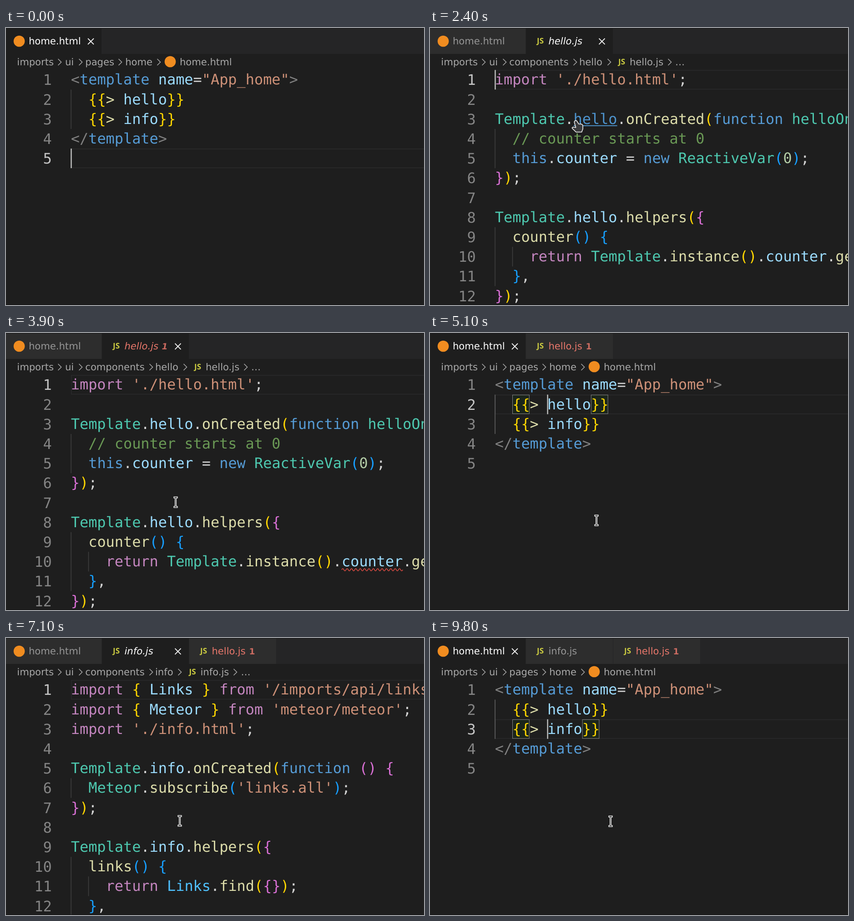
Animation, 919 px wide and 609 px high, one loop 10000 ms. Source, as an HTML page:

```html
<!DOCTYPE html>
<html lang="en">
<head>
<meta charset="utf-8">
<title>Editor navigation</title>
<style>
  html, body { margin: 0; width: 100%; height: 100%; overflow: hidden; background: #1e1e1e; }
  svg { display: block; width: 919px; height: 609px; }
  text { text-rendering: geometricPrecision; }
  .code { font: 31.89px "DejaVu Sans Mono", monospace; }
  .ui { font: 21.1px "DejaVu Sans", sans-serif; }
  .italic { font-style: italic; }
  .badge { font: 600 18.7px "DejaVu Sans", sans-serif; opacity: .85; }
  .badge.italic { font-style: italic; }
  .js { font: 700 17px "Open Sans", sans-serif; fill: #cbcb41; text-anchor: middle; }
</style>
</head>
<body>
<svg viewBox="0 0 919 609">
  <rect width="919" height="609" fill="#1e1e1e"/>
  <g id="view"></g>
  <rect id="caret" width="2.4" height="43" fill="#c4c5c3"/>
  <rect width="919" height="1.2" fill="#19191a"/>
  <rect y="608" width="919" height="1" fill="#121213"/>
  <g id="mouse">
    <g id="beam" fill="none" stroke-linecap="square">
      <path d="M-2.6-10.5H2.6M0-10.5V10.5M-2.6 10.5H2.6" stroke="#fff" stroke-width="4"/>
      <path d="M-2.6-10.5H2.6M0-10.5V10.5M-2.6 10.5H2.6" stroke="#222" stroke-width="1.3"/>
    </g>
    <path id="hand" fill="#3b3b3d" stroke="#f4f4f4" stroke-width="1.6" stroke-linejoin="round"
      d="M-3 0Q-.8-1.6 1 .6L5 7L10.5 7.2Q14 7.8 14 11.5V18L11.5 24.8H-1L-9 17Q-10.5 14.8-8 14L-1.4 14.8L-4.8 3Q-4.8.8-3 0Z"/>
  </g>
</svg>
<script>
const LOOP = 10000, LEFT = 142.8, TOP = 92.3, CW = 19.2, LH = 43.2;
const $ = id => document.getElementById(id);
const view = $('view'), caret = $('caret'), mouse = $('mouse'), beam = $('beam'), hand = $('hand');

const colors = {
  g: '#808080', b: '#569cd6', v: '#9cdcfe', s: '#ce9178', w: '#d4d4d4', y: '#ffd700',
  f: '#dcdcaa', p: '#c586c0', t: '#4ec9b0', c: '#6a9955', u: '#179fff', m: '#da70d6',
  n: '#b5cea8', k: '#4fc1ff'
};

// "~x" switches to colour x
const files = {
  home: {
    title: 'home.html',
    dirs: [['pages', 174.3], ['home', 262.2]], chevrons: [251, 336], icon: 361, nameX: 382,
    guides: [[0, 2, 3]],
    code: [
      '~g<~btemplate~v name~w=~s"App_home"~g>',
      '  ~y{{~f>~v hello~y}}',
      '  ~y{{~f>~v info~y}}',
      '~g</~btemplate~g>',
      ''
    ]
  },
  hello: {
    title: 'hello.js',
    dirs: [['components', 174.3], ['hello', 328]], chevrons: [319, 394, 527], icon: 421.5, nameX: 439, moreX: 539,
    guides: [[0, 4, 5], [0, 9, 11], [2, 10, 10]],
    code: [
      "~pimport~s './hello.html'~w;",
      '',
      '~tTemplate~w.~vhello~w.~fonCreated~y(~bfunction~t helloOnCreated',
      '  ~c// counter starts at 0',
      '  ~bthis~w.~vcounter~w =~b new~t ReactiveVar~u(~n0~u)~w;',
      '~m}~y)~w;',
      '',
      '~tTemplate~w.~vhello~w.~fhelpers~y(~m{',
      '  ~fcounter~u()~u {',
      '    ~preturn~t Template~w.~finstance~y()~w.~vcounter~w.~fget~y()~w;',
      '  ~u}~w,',
      '~m}~y)~w;'
    ]
  },
  info: {
    title: 'info.js',
    dirs: [['components', 174.3], ['info', 328]], chevrons: [319, 382, 504], icon: 410, nameX: 427.5, moreX: 516.5,
    guides: [[0, 6, 6], [0, 10, 12], [2, 11, 11]],
    code: [
      "~pimport~y {~v Links~y }~p from~s '/imports/api/links.js'~w;",
      "~pimport~y {~v Meteor~y }~p from~s 'meteor/meteor'~w;",
      "~pimport~s './info.html'~w;",
      '',
      '~tTemplate~w.~vinfo~w.~fonCreated~y(~bfunction~m ()~m {',
      "  ~tMeteor~w.~fsubscribe~u(~s'links.all'~u)~w;",
      '~m}~y)~w;',
      '',
      '~tTemplate~w.~vinfo~w.~fhelpers~y(~m{',
      '  ~flinks~u()~u {',
      '    ~preturn~k Links~w.~ffind~y(~m{}~y)~w;',
      '  ~u}~w,'
    ]
  }
};

// caret: time, file, line, column
const steps = [
  [0, 'home', 5, 0], [1500, 'home', 2, 9], [2000, 'hello', 1, 0], [4500, 'hello', 8, 12],
  [4700, 'home', 2, 6], [6200, 'home', 3, 8], [6400, 'info', 1, 0], [8300, 'info', 9, 11],
  [8600, 'home', 3, 6]
];
// link under the pointer: from, to, line, column, length
const links = [
  [1150, 2000, 2, 6, 5], [2200, 2600, 3, 9, 5], [4250, 4700, 8, 9, 5],
  [6000, 6400, 3, 6, 4], [8000, 8600, 9, 9, 4]
];
// pointer: time, x, y
const path = [
  [100, 430, 562], [1100, 318, 166], [2000, 318, 166], [2350, 322, 204], [2650, 322, 204],
  [3300, 373, 372], [4000, 373, 372], [4250, 366, 412], [5300, 366, 412], [6000, 300, 203],
  [6500, 300, 203], [7050, 382, 402], [7500, 382, 402], [8000, 365, 457], [8600, 365, 457],
  [8850, 397, 403], [LOOP, 397, 403]
];
const HELLO_OPEN = 2000, INFO_OPEN = 6400, ERROR_AT = 3000;

const colX = c => LEFT + c * CW;
const lineY = n => TOP + (n - 1) * LH;
const baseY = n => Math.round(lineY(n) + 32);
const esc = s => s.replace(/&/g, '&amp;').replace(/</g, '&lt;');
const rect = (x, y, w, h, fill, more = '') =>
  `<rect x="${x}" y="${y}" width="${w}" height="${h}" fill="${fill}" ${more}/>`;
const text = (s, x, y, cls, fill, more = '') =>
  `<text x="${x}" y="${y}" class="${cls}" fill="${fill}" ${more}>${esc(s)}</text>`;
const stroke = (d, color, w) => `<path d="${d}" fill="none" stroke="${color}" stroke-width="${w}"/>`;
const fileIcon = (name, x, y) => name === 'home'
  ? `<circle cx="${x}" cy="${y}" r="12.3" fill="#f08c20"/>`
  : text('JS', x, y + 5.5, 'js', '');

function drawTab(name, i, active, error) {
  const x = i ? 211 + (i - 1) * 192 : 0, w = i ? 191 : 210;
  const style = active && name !== 'home' ? ' italic' : '';
  const red = error && name === 'hello';
  const fill = red ? '#e8776b' : active ? '#fff' : '#969696';
  let s = rect(x, 0, w, 57, active ? '#1e1e1e' : '#2d2d2d');
  s += fileIcon(name, i ? x + 31.5 : 29, i ? 28 : 29);
  s += text(files[name].title, i ? x + 49.5 : 50, 36, 'ui' + style, fill);
  if (red) s += text('1', x + 131.5, 36, 'badge' + style, fill);
  if (active) {
    const cx = i ? x + 167 : 186.5;
    s += stroke(`M${cx - 6.5} 23l13 13m0-13l-13 13`, '#f0f0f0', 1.8);
  }
  return s;
}

function drawCrumbs(name) {
  const f = files[name], gray = '#a9a9a9';
  let s = '';
  for (const [label, x] of [['imports', 24.3], ['ui', 130], ...f.dirs, [f.title, f.nameX]])
    s += text(label, x, 82, 'ui', gray);
  if (f.moreX) s += text('…', f.moreX, 82, 'ui', gray);
  for (const x of [118, 164, ...f.chevrons])
    s += stroke(`M${x - 3.5} 68l7 7-7 7`, gray, 1.6);
  return s + fileIcon(name, f.icon, 74);
}

function drawLine(src, n, link) {
  let col = 0, s = '';
  for (const part of src.split('~')) {
    // a part without a colour is the indent
    if (!part.trim()) { col += part.length; continue; }
    const token = part.slice(1), word = token.trimStart();
    col += token.length - word.length;
    const hot = link && link[2] === n && link[3] === col;
    s += text(word, colX(col), baseY(n), 'code', hot ? '#4e94ce' : colors[part[0]]);
    if (hot) s += rect(colX(col), baseY(n) + 2.8, link[4] * CW, 1.9, '#4e94ce');
    col += word.length;
  }
  return s;
}

function drawView(name, line, link, error, tabs) {
  const f = files[name];
  let s = rect(0, 0, 919, 57, '#252526');
  tabs.forEach((tab, i) => { s += drawTab(tab, i, tab === name, error); });
  s += drawCrumbs(name);
  s += rect(LEFT + .8, lineY(line) + .8, 790, LH - 1.8, 'none', 'stroke="#2a2a2b" stroke-width="1.6"');
  for (const [c, a, b] of f.guides) {
    const near = line >= a - 1 && line <= b;
    s += rect(colX(c) - .5, lineY(a), 1.5, (b - a + 1) * LH, near ? '#686868' : '#404040');
  }
  if (name === 'home' && line < 4) {
    for (const c of [2, line === 2 ? 11 : 10])
      s += rect(colX(c) + .3, lineY(line) + .7, 2 * CW - 1.6, LH - 1.8, 'rgba(0,100,0,.1)', 'stroke="#888"');
  }
  f.code.forEach((src, i) => {
    const n = i + 1;
    s += text(String(n), 100.6, baseY(n) + 1, 'code', n === line ? '#c6c6c6' : '#858585', 'text-anchor="end"');
    s += drawLine(src, n, link);
  });
  if (error && name === 'hello') {
    let d = `M${colX(31)} ${baseY(10) + 7.5}`;
    for (let i = 0; i < 14; i++) d += 'q2.4-5 4.8 0t4.8 0';
    s += stroke(d, '#df4d44', 1.7);
  }
  return s;
}

function pointerAt(t) {
  const i = path.findIndex(p => p[0] > t);
  const a = path[i - 1], b = path[i];
  const k = (t - a[0]) / (b[0] - a[0]), e = k * k * (3 - 2 * k);
  return [a[1] + (b[1] - a[1]) * e, a[2] + (b[2] - a[2]) * e];
}

let lastKey = '';
function frame(now) {
  const t = now % LOOP;
  const [since, name, line, col] = steps.filter(s => s[0] <= t).pop();
  const link = links.find(l => t >= l[0] && t < l[1]);
  const error = t >= ERROR_AT;
  const tabs = ['home', t >= INFO_OPEN && 'info', t >= HELLO_OPEN && 'hello'].filter(Boolean);
  const key = [since, link, error, tabs].join();
  if (key !== lastKey) {
    view.innerHTML = drawView(name, line, link, error, tabs);
    caret.setAttribute('x', colX(col) - .6);
    caret.setAttribute('y', lineY(line));
    lastKey = key;
  }
  caret.style.visibility = (t - since) % 1000 < 500 ? 'visible' : 'hidden';

  const shown = t >= path[0][0];
  mouse.style.display = shown ? '' : 'none';
  if (shown) {
    mouse.setAttribute('transform', `translate(${pointerAt(t)})`);
    hand.style.display = link ? '' : 'none';
    beam.style.display = link ? 'none' : '';
  }
}

const start = performance.now();
function loop() {
  frame(performance.now() - start);
  requestAnimationFrame(loop);
}
loop();
</script>
</body>
</html>
```
